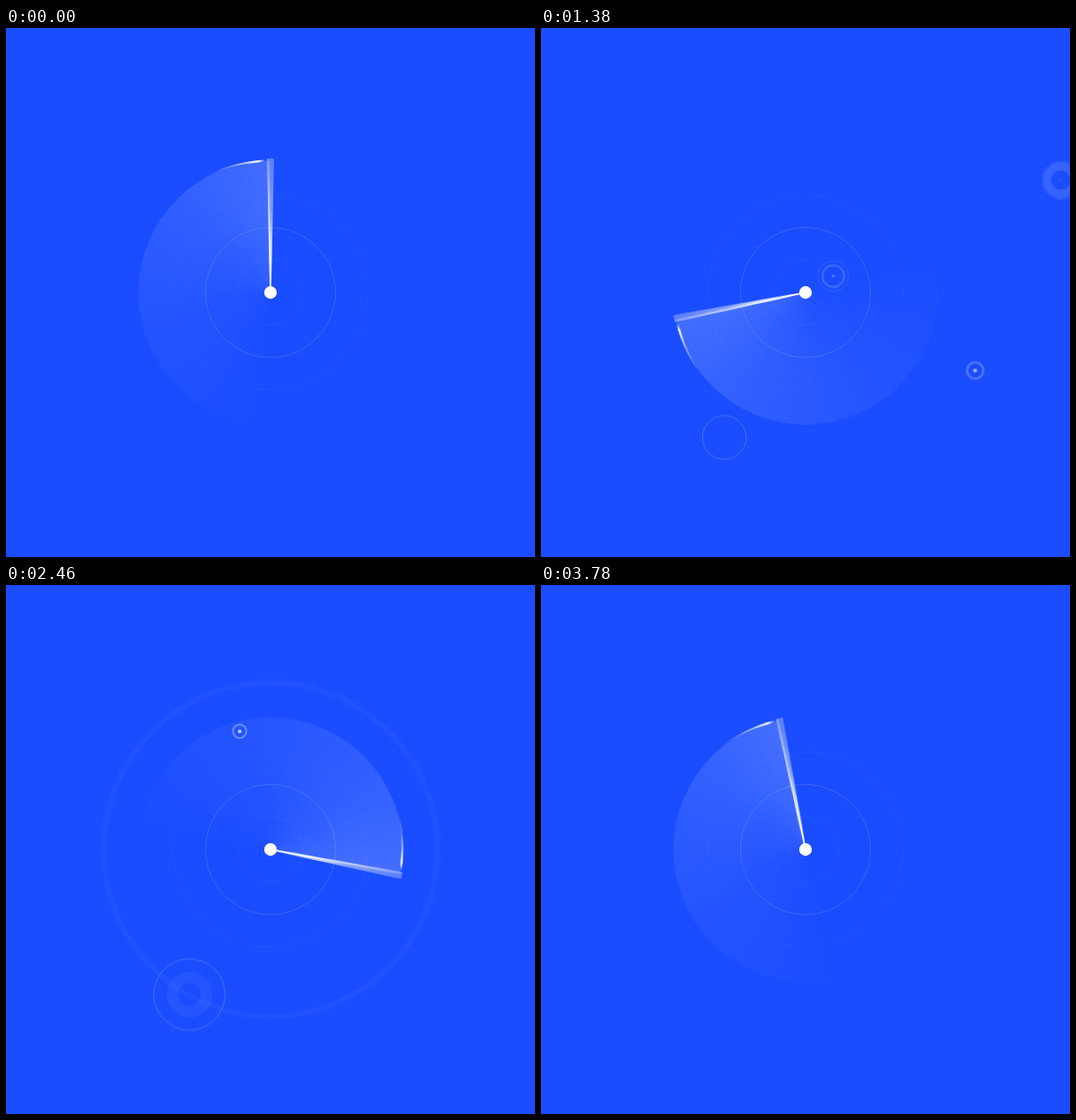
Write an HTML page that moves like this. It is 600 px wide and 600 px high and loops after 3.84 s.

```html
<!DOCTYPE html>
<html lang="en">
<head>
<meta charset="utf-8">
<title>Radar sweep</title>
<style>
  html, body { margin: 0; width: 100%; height: 100%; overflow: hidden; background: #1a4dff; }
  .stage { position: relative; width: 600px; height: 600px; overflow: hidden; background: #1a4dff; }
  svg { position: absolute; inset: 0; }

  .trail {
    position: absolute; left: 150px; top: 150px; width: 300px; height: 300px; border-radius: 50%;
    background: conic-gradient(#fff0 178deg, #ffffff0d 265deg, #ffffff1c 320deg, #ffffff2e 359deg, #fff0 359.5deg);
    -webkit-mask: radial-gradient(closest-side, #0009, #000 60%);
    mask: radial-gradient(closest-side, #0009, #000 60%);
  }
  .turn { animation: turn 3840ms -4ms infinite; }

  /* 30 ms ticks of 5.625deg, with a few held and skipped ticks */
  @keyframes turn {
    0%        { transform: rotate(0deg); animation-timing-function: steps(5); }
    3.90625%  { transform: rotate(28.125deg); animation-timing-function: steps(1); }
    5.46875%  { transform: rotate(33.75deg); animation-timing-function: steps(38); }
    35.15625% { transform: rotate(247.5deg); animation-timing-function: steps(1); }
    35.9375%  { transform: rotate(258.75deg); animation-timing-function: steps(36); }
    64.0625%  { transform: rotate(461.25deg); animation-timing-function: steps(1); }
    65.625%   { transform: rotate(466.875deg); animation-timing-function: steps(28); }
    87.5%     { transform: rotate(624.375deg); animation-timing-function: steps(1); }
    88.28125% { transform: rotate(635.625deg); animation-timing-function: steps(13); }
    98.4375%  { transform: rotate(708.75deg); animation-timing-function: steps(1); }
    100%      { transform: rotate(720deg); }
  }

  .wave, .ping, .core { fill: none; stroke: #fff; }
  .dot { fill: #fff; }
  .wave, .ping, .core, .dot { animation: 3840ms linear infinite both; }

  .wave { animation-name: wave; filter: blur(1px); }
  @keyframes wave {
    0%    { r: 0px; stroke-width: 2px; opacity: 0; }
    10%   { opacity: 0; }
    14%   { opacity: .35; }
    28%   { opacity: 1; }
    32.8% { r: 441px; stroke-width: 11px; opacity: 1; }
    32.9%, 100% { r: 441px; stroke-width: 11px; opacity: 0; }
  }

  .big .ping { animation-name: big-ping; }
  @keyframes big-ping {
    0%    { r: 0px; opacity: 0; }
    3.8%  { opacity: .06; }
    11%   { opacity: .22; }
    17%   { opacity: .2; }
    19.8% { opacity: .06; }
    20.5%, 100% { r: 48.5px; opacity: 0; }
  }
  .big .core { animation-name: big-core; }
  @keyframes big-core {
    0%, 12.5% { r: 7px; stroke-width: 1.5px; opacity: 0; }
    19.8% { r: 10px; stroke-width: 4px; opacity: .24; }
    21.5% { r: 10.8px; stroke-width: 4.2px; opacity: .22; }
    38.6% { r: 19.5px; stroke-width: 13px; opacity: .05; }
    42.2%, 100% { r: 21px; stroke-width: 14px; opacity: 0; }
  }
  .big .dot { animation-name: big-dot; }
  @keyframes big-dot {
    0%, 12.5% { r: 0px; opacity: .2; }
    19.8% { r: 3.1px; opacity: .6; }
    21.5% { r: 3.5px; opacity: .52; }
    34%, 100% { r: 0px; opacity: 0; }
  }

  .small .ping { animation-name: small-ping; }
  @keyframes small-ping {
    0%    { r: 0px; opacity: 0; animation-timing-function: cubic-bezier(.33, .67, .67, 1); }
    4%    { opacity: .14; }
    7.8%  { opacity: .11; }
    10.6% { opacity: .06; }
    13.5%, 100% { r: 24.5px; opacity: 0; }
  }
  .small .core { animation-name: small-core; }
  @keyframes small-core {
    0%, 9.9% { r: 3.5px; stroke-width: .5px; opacity: 0; }
    10.6% { r: 4px; stroke-width: 1px; opacity: .25; }
    16.1% { r: 7.6px; stroke-width: 2.3px; opacity: .3; }
    18.3% { r: 8.5px; stroke-width: 2.8px; opacity: .25; }
    29.4% { r: 13px; stroke-width: 1.6px; opacity: .2; }
    33.9%, 100% { r: 14px; stroke-width: .5px; opacity: 0; }
  }
  .small .dot { animation-name: small-dot; }
  @keyframes small-dot {
    0%, 9.9% { r: 0px; opacity: 0; }
    10.6% { r: 1px; opacity: .3; }
    16.1% { r: 2.2px; opacity: .65; }
    18.3% { r: 2.5px; opacity: .6; }
    29.4% { r: 1.1px; opacity: .35; }
    33.9%, 100% { r: 0px; opacity: 0; }
  }
</style>
</head>
<body>
<div class="stage">
  <div class="trail turn"></div>
  <svg width="600" height="600" viewBox="-300 -300 600 600">
    <defs>
      <linearGradient id="beam" gradientUnits="userSpaceOnUse" x1="0" y1="0" x2="0" y2="-152">
        <stop offset="0" stop-color="#fff"/>
        <stop offset=".3" stop-color="#fff" stop-opacity=".85"/>
        <stop offset=".6" stop-color="#fff" stop-opacity=".45"/>
        <stop offset="1" stop-color="#fff" stop-opacity=".27"/>
      </linearGradient>
      <linearGradient id="edge" gradientUnits="userSpaceOnUse" x1="0" y1="0" x2="0" y2="-152">
        <stop offset=".2" stop-color="#fff" stop-opacity=".8"/>
        <stop offset="1" stop-color="#fff" stop-opacity=".08"/>
      </linearGradient>
      <linearGradient id="rim" gradientUnits="userSpaceOnUse" x1="-76" y1="0" x2="-5" y2="0">
        <stop offset="0" stop-color="#fff" stop-opacity="0"/>
        <stop offset=".5" stop-color="#fff" stop-opacity=".45"/>
        <stop offset=".88" stop-color="#fff" stop-opacity=".95"/>
        <stop offset="1" stop-color="#fff" stop-opacity="0"/>
      </linearGradient>
    </defs>

    <g opacity=".04"><circle class="wave"/></g>
    <g opacity=".08"><circle class="wave" style="animation-delay: 1920ms"/></g>

    <g fill="none" stroke="#fff">
      <circle r="37" opacity=".04"/>
      <circle r="73.7" opacity=".14"/>
      <circle r="110.5" opacity=".035"/>
    </g>

    <g id="blips"></g>

    <g class="turn">
      <path d="M-75.3-130.4A150.6 150.6 0 0 1-5-150.4Q-8-148-14-147.4A152 152 0 0 0-75.3-130.4Z" fill="url(#rim)"/>
      <path d="M-.7 0L-4-152H4L.7 0Z" fill="url(#beam)"/>
      <path d="M-.6 0L-4-152H-1L.2 0Z" fill="url(#edge)"/>
    </g>
    <circle r="7.2" fill="#fff"/>
  </svg>
</div>
<script>
  // kind, x, y, start in ms
  const blips = [
    ['big', 289.5, -127.5, 214],
    ['small', 31.5, -18.5, 318],
    ['small', 192.5, 88.5, 612],
    ['big', -92, 164.5, 978],
    ['small', -35, -134, 1842],
  ];
  const echo = 827;
  const circle = (name, delay) => `<circle class="${name}" style="animation-delay:${delay}ms"/>`;

  document.getElementById('blips').innerHTML = blips.map(([kind, x, y, start]) =>
    `<g class="${kind}" transform="translate(${x} ${y})">` +
    circle('ping', start) + circle('ping', start + echo) +
    circle('core', start) + circle('dot', start) + '</g>').join('');
</script>
</body>
</html>
```
